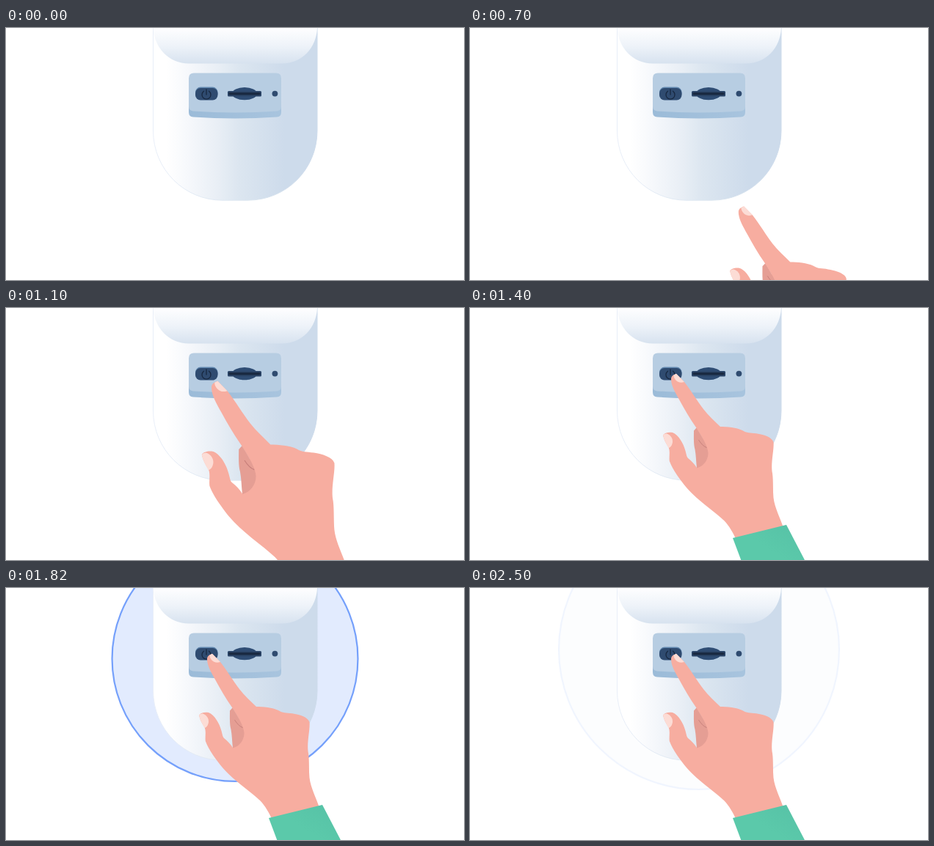
Write an HTML page that moves like this. It is 624 px wide and 344 px high and loops after 3.6 s.

```html
<!DOCTYPE html>
<html lang="en">
<head>
<meta charset="utf-8">
<title>Press the power button</title>
<style>
  html, body { margin: 0; width: 100%; height: 100%; overflow: hidden; background: #fff; }
  svg { display: block; width: 100vw; height: 100vh; }
</style>
</head>
<body>
<svg viewBox="0 0 624 344">
  <defs>
    <linearGradient id="body">
      <stop offset=".08" stop-color="#fff"/>
      <stop offset=".2" stop-color="#f7f9fc"/>
      <stop offset=".4" stop-color="#e8eef5"/>
      <stop offset=".52" stop-color="#dce6f0"/>
      <stop offset=".8" stop-color="#cddbeb"/>
    </linearGradient>
    <linearGradient id="edge">
      <stop offset="0" stop-color="#e8eef8"/>
      <stop offset=".6" stop-color="#dae5ef"/>
      <stop offset="1" stop-color="#cddbeb"/>
    </linearGradient>
    <linearGradient id="lid" x2="0" y2="1">
      <stop offset="0" stop-color="#fefeff"/>
      <stop offset=".5" stop-color="#eef3f9"/>
      <stop offset="1" stop-color="#d7e2ef"/>
    </linearGradient>
    <linearGradient id="side">
      <stop offset="0" stop-color="#9bbbd8"/>
      <stop offset="1" stop-color="#a8c4de"/>
    </linearGradient>
    <linearGradient id="sleeve" x1="1" x2=".6" y2=".5">
      <stop offset="0" stop-color="#55bfa5"/>
      <stop offset="1" stop-color="#5bc9aa"/>
    </linearGradient>
  </defs>

  <circle id="halo" cx="312" fill="#d9e6fe" stroke="#4a83fa" stroke-width="2.2"/>

  <g id="device">
    <path fill="url(#body)" stroke="url(#edge)" d="M200.5-2V140C200.5 193 243 235.2 295 235.2H329C382 235.2 424 193 424 140V-2Z"/>
    <path fill="url(#lid)" d="M200.5 0C202 27 222 48.5 249 48.5H376C403 48.5 423 27 424 0Z"/>
    <path fill="url(#side)" d="M249 100V115Q249 121 255 121.5Q312 125.5 369 121.5Q375 121 375 115V100Z"/>
    <path fill="#b7cde2" d="M256 61.5H368Q375 61.5 375 68.5V107Q375 113 369 113.4Q312 117.5 255 113.4Q249 113 249 107V68.5Q249 61.5 256 61.5Z"/>
    <rect x="258" y="80.6" width="30.5" height="16" rx="7" fill="#5f86ae"/>
    <rect x="258" y="82" width="30.5" height="16.5" rx="7" fill="#2f4b70"/>
    <path fill="none" stroke="#182840" stroke-width="1.3" stroke-linecap="round" d="M269.5 86.2A6 6 0 1 0 276.5 86.2M273 84V91"/>
    <ellipse cx="325" cy="89.7" rx="17" ry="8.6" fill="#2f4d74"/>
    <rect x="302" y="86" width="46" height="7.6" rx="1.5" fill="#2c4669"/>
    <rect x="303.5" y="88" width="43" height="3.6" rx="1" fill="#1a2a42"/>
    <circle cx="366.4" cy="89.6" r="3.9" fill="#2f4b70"/>
  </g>

  <g id="hand">
    <path fill="#f7ada0" d="M274 97C274 93 277 91 281 89.7L292 101C302 114 309 126 318 138C325 147 333 154 341 162C350 162 363 163 371 167C377 171 382 170 390 171.3C400 173 411 176 413.5 183C414.5 193 410 209 411.5 223C413.5 232 412.5 247 413.5 259C415 273 423 287 428 303L364 319C359 308 353 297 346 290C332 277 308 261 294 244C287 235 276 221 271.8 209C271 202 273 196 270.5 190C267 185 264 179 263 173.5C265 170 271 169 276 170C284 173 291 185 293.5 195C295 200 295 203 297 205C302 209 306 213 309 218L317 178L308 163C299 150 292 138 285 125C280 116 274 106 274 97Z"/>
    <path fill="#e59e94" d="M308.5 163.5L305 167.5C305 176 304.5 186 306.5 193C308 201 308 210 309 218.5C318 216 324.5 208 324.5 198C324 190 319 180 308.5 163.5Z"/>
    <path fill="none" stroke="#c57d79" stroke-width=".9" d="M311.5 180C314 184 318 189 322.5 190.5"/>
    <path fill="#fcdcd5" d="M277.5 91.5L281 89.7L292 101C289 102 286 102 284 101C280 99 277.5 95.5 277.5 91.5Z"/>
    <path fill="#fcdcd5" d="M263 173.5Q264.5 171.3 268 171.5C273 173 276.5 178 276 183C275.5 187 273.5 190.5 270.5 191C267 185 264 179 263 173.5Z"/>
    <path fill="url(#sleeve)" d="M358 314L431 296L482 394H388Z"/>
  </g>
</svg>
<script>
const halo = document.getElementById('halo');
const hand = document.getElementById('hand');
const LOOP = 3600, TIP = [274, 90], ENTRY = [152, 254.6];

const ramp = (t, a, b) => Math.min(1, Math.max(0, (t - a) / (b - a)));
const smooth = (t, a, b) => { const u = ramp(t, a, b); return u * u * (3 - 2 * u); };
const easeInOut = (u, p) => u < .5 ? (2 * u) ** p / 2 : 1 - (2 - 2 * u) ** p / 2;

function draw(t) {
  // The hand slides in, swells, then shrinks back as it presses.
  const away = 1 - easeInOut(ramp(t, 200, 1300), 2.5);
  const size = 1 + .2 * (smooth(t, 600, 900) - smooth(t, 1100, 1400));
  const [x, y] = TIP.map((v, i) => v + ENTRY[i] * away);
  hand.setAttribute('transform',
    `translate(${x} ${y}) scale(${size}) translate(${-TIP[0]} ${-TIP[1]})`);

  // The halo grows upward from below its final centre, then fades.
  const grow = 1 - (1 - ramp(t, 1600, 2040)) ** 3;
  halo.setAttribute('r', 191 * grow);
  halo.setAttribute('cy', 185 - 101 * grow);
  halo.setAttribute('opacity', ramp(t, 1600, 1890) * (1 - .925 * smooth(t, 2040, 2500)));
}

const start = performance.now();
function tick() {
  draw((performance.now() - start) % LOOP);
  requestAnimationFrame(tick);
}
tick();
</script>
</body>
</html>
```
